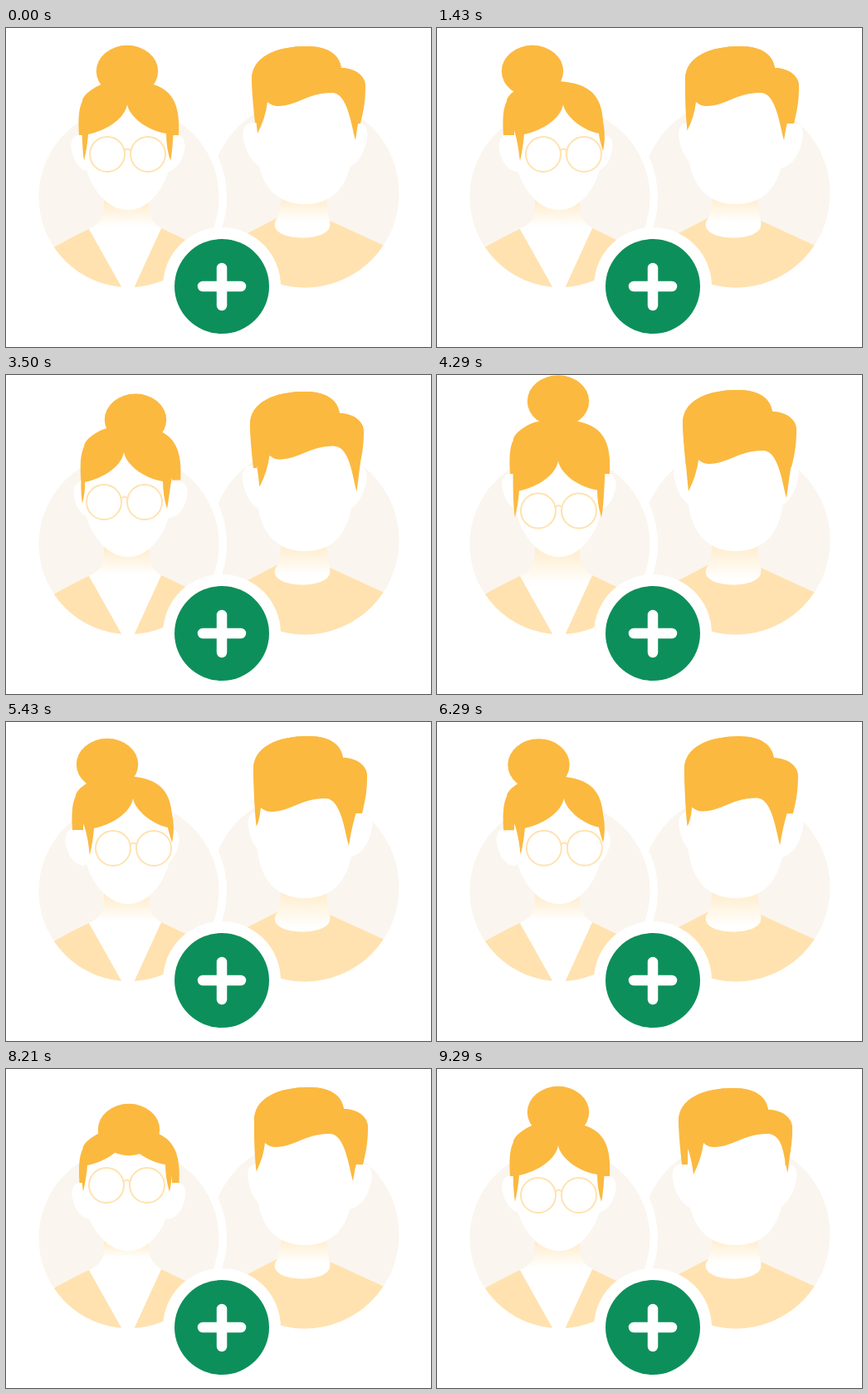
Write an HTML page that moves like this. It is 512x384 px and loops after 9370 ms.

```html
<!DOCTYPE html>
<html lang="en">
<head>
<meta charset="utf-8">
<title>Add people</title>
<style>
html, body { margin: 0; width: 100%; height: 100%; overflow: hidden; background: #fff; }
svg { display: block; width: 100vw; height: 100vh; }
.skin { fill: #fff; }
.hair { fill: #fbb940; }
.cloth { fill: #ffe2af; }
.disc { fill: #faf5ee; }
.glasses { fill: none; stroke: #ffe2af; stroke-width: 2; }
</style>
</head>
<body>
<svg viewBox="0 0 512 384">
  <defs>
    <clipPath id="clipM"><circle cx="360" cy="199" r="113.5"/></clipPath>
    <clipPath id="clipW"><circle cx="148" cy="203.5" r="108.5"/></clipPath>
    <linearGradient id="shadeM" gradientUnits="userSpaceOnUse" x1="0" y1="203" x2="0" y2="233">
      <stop offset="0" stop-color="#ffecca"/><stop offset="1" stop-color="#fff"/>
    </linearGradient>
    <linearGradient id="shadeW" gradientUnits="userSpaceOnUse" x1="0" y1="208" x2="0" y2="239">
      <stop offset="0" stop-color="#ffecca"/><stop offset="1" stop-color="#fff"/>
    </linearGradient>
  </defs>

  <g id="man">
    <circle class="disc" cx="360" cy="199" r="113.5"/>
    <path class="cloth" clip-path="url(#clipM)" d="M245 271L326 229L390 232L460 264V320H245Z"/>
    <path fill="url(#shadeM)" d="M332 198Q331 220 327 229Q323 233 324 239C328 257 386 257 390 239Q391 233 389 229Q386 215 386 198Z"/>
    <g id="earsM" class="skin">
      <path id="earM" d="M300 115C288 112 284 122 286 133C290 155 300 166 313 169L330 115Z"/>
      <use href="#earM" transform="translate(721) scale(-1 1)"/>
    </g>
    <path id="backM" class="hair"/>
    <path class="skin" d="M302 100V148C305 186 322 212 360 212C398 212 414 186 418 148L420 100C414 58 306 58 302 100Z"/>
    <path id="frontM" class="hair"/>
  </g>

  <circle class="skin" cx="148" cy="203.5" r="118" clip-path="url(#clipM)"/>
  <g id="woman">
    <circle class="disc" cx="148" cy="203.5" r="108.5"/>
    <path class="cloth" clip-path="url(#clipW)" d="M40 274Q78 252 100 242L140 313H154L187 241L260 276V330H40Z"/>
    <path fill="url(#shadeW)" d="M118 198V220Q117 234 100 242L140.500 314H153.500L187 241Q174 234 172 218V198Z"/>
    <g id="earsW" class="skin">
      <path id="earW" d="M92 129C80 127 77 138 79 147C82 162 89 172 102 173L120 129Z"/>
      <use href="#earW" transform="translate(294) scale(-1 1)"/>
    </g>
    <path id="backW" class="hair"/>
    <path class="skin" d="M93 124V150C96 188 120 219 147 219C174 219 197 188 200 150V124C190 78 104 78 93 124Z"/>
    <path id="frontW" class="hair"/>
    <ellipse id="bun" class="hair" cx="146" cy="52" rx="37.200" ry="31.200"/>
    <g id="specs" class="glasses">
      <circle cx="122" cy="152" r="21"/>
      <circle cx="171" cy="152" r="21"/>
      <path d="M142.500 148Q146.500 143 150.500 148"/>
    </g>
  </g>

  <circle class="skin" cx="260" cy="311" r="71"/>
  <circle cx="260" cy="311" r="57" fill="#0d8f5b"/>
  <path d="M237 311H283M260 289V334" stroke="#fff" stroke-width="12.500" stroke-linecap="round"/>
</svg>
<script>
const LOOP = 9370, STEP = 1000 / 14;
const $ = id => document.getElementById(id);

// Offsets from rest: cap x,y, fringe x,y, ears x,y, bun x,y
const womanPose = {
  rest:    [0, 0, 0, 0, 0, 0, 0, 0],
  right:   [-8, 0, 6, 0, -4, 0, -31, 0],
  rightLo: [-8, 1, 7, 0, -7, 0, -24, -1],
  left:    [4.5, 5, -8, -9.5, 6, 9, 20, 24],
  down:    [0, -10, 0, 11.5, 0, -10, 0, -20.5],
  up:      [.5, 8, -1, -12, 1, 8, 2, 21]
};
const manPose = {
  rest:    [0, 0, 0, 0, 0, 0],
  left:    [3, 0, -3, 0, 5.5, 0],
  right:   [-5, 1, 6, 0, -2, 0],
  down:    [0, -4, 0, 13, 0, -9],
  leftLo:  [2, -5, -8, 14, 6, -6],
  rightUp: [-4, 6, 5, -9, -3, 8],
  leftUp:  [4, 6, -5, -9, 5, 8]
};
const womanKeys = [
  [0, 'rest'], [1000, 'right'], [2000, 'right'], [2560, 'left'], [3100, 'left'],
  [3900, 'down'], [4400, 'down'], [5430, 'rightLo'], [6200, 'rightLo'],
  [7150, 'up'], [8300, 'up'], [9280, 'rest'], [LOOP, 'rest']
];
const manKeys = [
  [0, 'rest'], [800, 'left'], [1430, 'left'], [2050, 'right'], [3000, 'right'],
  [3900, 'down'], [4800, 'down'], [5430, 'leftLo'], [6200, 'leftLo'],
  [7150, 'rightUp'], [7250, 'rightUp'], [7900, 'leftUp'], [8200, 'left'],
  [9000, 'right'], [LOOP, 'right']
];

function poseAt(keys, poses, t) {
  const i = keys.findIndex((k, n) => n && t <= k[0]);
  const [t0, a] = keys[i - 1], [t1, b] = keys[i];
  const u = (1 - Math.cos(Math.PI * (t - t0) / (t1 - t0))) / 2;
  return poses[a].map((v, n) => v + (poses[b][n] - v) * u);
}

const shift = (dx, dy) => (...p) =>
  p.map((v, i) => (v + (i % 2 ? dy : dx)).toFixed(2)).join(' ');
const move = (el, x, y) => el.setAttribute('transform', `translate(${x} ${y})`);
const draw = (id, d) => $(id).setAttribute('d', d);

// A lock that turns out of view stops at its limit and gets shorter
function lockTip(x, y, limit, side, rate) {
  const over = Math.max(0, (x - limit) * side);
  return [x - over * side, y - over * rate];
}

function drawWoman(t) {
  const [cx, cy, fx, fy, ex, ey, bx, by] = poseAt(womanKeys, womanPose, t);
  const c = shift(cx, cy), f = shift(fx, fy);
  const [lx, ly] = lockTip(94 + fx, 160 + fy, 92, -1, 3);
  const [rx, ry] = lockTip(198 + fx, 160 + fy, 200, 1, 3);
  const top = `C${c(92, 82, 103, 72, 118, 67)}C${c(134, 63, 158, 63, 174, 67)}`;
  draw('backW', `M${c(88, 129)}C${c(87, 112, 87, 98, 92, 88)}${top}C${c(203, 74, 210, 96, 208, 129)}Z`);
  draw('frontW', `M${lx} ${ly}C${lx - 2} ${ly - 15} ${lx - 3} ${ly - 32} ${c(92, 100)}${top}` +
    `C${c(190, 71, 200, 84, 204, 100)}C${rx + 3} ${ry - 32} ${rx + 3} ${ry - 12} ${rx} ${ry}` +
    `Q${rx - 5} ${ry - 16} ${Math.min(rx - 5, 193 + fx)} ${127 + fy}` +
    `C${f(172, 124, 149, 108, 146, 92)}C${f(143, 109, 122, 123, 99, 128)}` +
    `Q${lx + 4} ${ly - 18} ${lx} ${ly}Z`);
  move($('bun'), bx, by);
  move($('earsW'), ex, ey);
  move($('specs'), fx, fy);
  $('shadeW').setAttribute('y2', 239 + fy);
}

function drawMan(t) {
  const [cx, cy, fx, fy, ex, ey] = poseAt(manKeys, manPose, t);
  const c = shift(cx, cy), f = shift(fx, fy);
  const [lx, ly] = lockTip(303 + fx, 127 + fy, 301.5, -1, 2.4);
  const [rx, ry] = lockTip(421 + fx, 135 + fy, 422.5, 1, 2.3);
  const top = `C${c(296, 35, 325, 22, 362, 22)}C${c(392, 22, 402, 35, 404, 48)}C${c(424, 49, 434, 60, 433, 72)}`;
  draw('backM', `M${c(300, 114)}C${c(298, 95, 296, 75, 296, 62)}${top}C${c(433, 90, 430, 103, 427, 115)}Z`);
  draw('frontM', `M${lx} ${ly}Q${lx - 3} ${ly - 27} ${c(296, 62)}${top}` +
    `Q${rx + 4} ${ry - 30} ${rx} ${ry}` +
    `C${rx - 5} ${ry - 17} ${f(412, 80, 394, 78)}` +
    `C${f(365, 77, 350, 94, 328, 94)}C${f(323, 94, 318, 92, 315, 89)}` +
    `Q${f(313, 107)} ${lx} ${ly}Z`);
  move($('earsM'), ex, ey);
  $('shadeM').setAttribute('y2', 233 + fy);
}

const start = performance.now();
function tick() {
  const now = Math.max(0, performance.now() - start) % LOOP;
  const t = Math.min(130, Math.floor((now + 5) / STEP)) * STEP;
  drawWoman(t);
  drawMan(t);
  requestAnimationFrame(tick);
}
tick();
</script>
</body>
</html>
```
